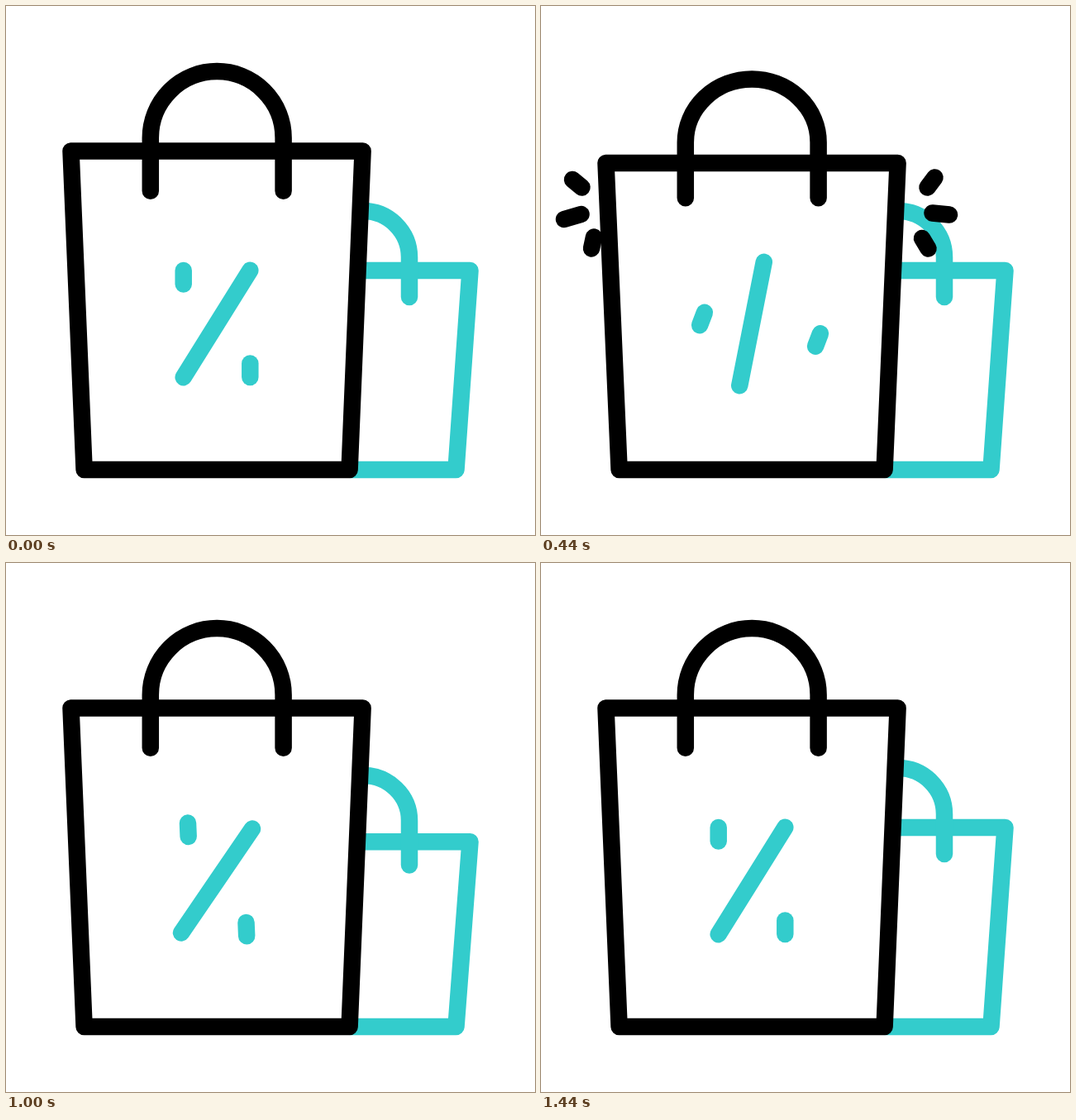
An HTML page for the animation above (1.48 s loop, 640 by 640 pixels).

```html
<!DOCTYPE html>
<html lang="en">
<head>
<meta charset="utf-8">
<title>Shopping bags</title>
<style>
  html, body { margin: 0; width: 100%; height: 100%; overflow: hidden; background: #fff; }
  svg { display: block; width: 100%; height: 100%; }
  g { fill: none; stroke-width: 20.5; stroke-linecap: round; stroke-linejoin: round; }
  .ink { stroke: #000; }
  .teal { stroke: #33cccc; }
  .solid { fill: #fff; }
</style>
</head>
<body>
<svg viewBox="0 0 640 640">
  <g class="teal" id="back">
    <path id="backBag"/>
    <path id="backHandle"/>
  </g>
  <g class="teal" id="backSparks"></g>
  <g class="ink" id="frontSparks"></g>
  <g id="front">
    <g class="ink">
      <path id="bag" class="solid"/>
      <path id="handle"/>
    </g>
    <g class="teal">
      <path id="slash" d="M214.7 449.2 L295.3 319.8"/>
      <path id="dotA" d="M0 -8.2 V8.2"/>
      <path id="dotB" d="M0 -8.2 V8.2"/>
    </g>
  </g>
</svg>
<script>
const LOOP = 1480, STEP = 40;
const $ = id => document.getElementById(id);
const set = (id, name, value) => $(id).setAttribute(name, value);

// Smooth curve through [time, value] keys, at rest at both ends.
function track(...keys) {
  const last = keys.length - 1;
  const slope = i => i === 0 || i === last ? 0 :
    (keys[i + 1][1] - keys[i - 1][1]) / (keys[i + 1][0] - keys[i - 1][0]);
  return t => {
    if (t <= keys[0][0]) return keys[0][1];
    if (t >= keys[last][0]) return keys[last][1];
    const i = keys.findIndex(k => k[0] > t) - 1;
    const [t0, a] = keys[i], [t1, b] = keys[i + 1];
    const d = t1 - t0, u = (t - t0) / d, w = u * u * (3 - 2 * u);
    return a + (b - a) * w + d * u * (1 - u) * (slope(i) * (1 - u) - slope(i + 1) * u);
  };
}

function hop(t, start, length, height) {
  const u = (t - start) / length;
  return u > 0 && u < 1 ? -4 * height * u * (1 - u) : 0;
}

const squash = (peak, mid) => track([120, 0], [320, peak], [440, mid], [500, 0]);
const front = {
  rim: squash(35.5, 14.5),
  grip: squash(20, 8.5),
  shoulder: squash(18.5, 5.5),
  crown: squash(12.5, 9.5)
};
const backSquash = track([120, 0], [320, 1], [440, 0], [900, 0], [1020, 0.5], [1090, 0]);

// The percent sign: the slash turns one way, the dots tilt the other way.
const spinTimes = [280, 320, 440, 680, 880, 1060];
const spinTrack = (...values) => track(...values.map((v, i) => [spinTimes[i], v]));
const spin = spinTrack(0, 1.35, 20.75, 97.2, 159.5, 180);
const dots = {
  dotA: [spinTrack(214.7, 212.5, 195, 217, 267.5, 295.3),
         spinTrack(328.2, 332, 378.5, 447, 450.5, 440.8)],
  dotB: [spinTrack(295.3, 299.5, 335, 319, 250.5, 214.7),
         spinTrack(440.8, 439.5, 404, 325.5, 307, 328.2)]
};

// Each spark is x, y of its inner end and x, y of its outer end.
const sparkSets = [
  {
    id: "frontSparks",
    head: track([380, -0.6], [440, 1], [500, 1.48]),
    tail: track([400, -0.6], [440, 0], [560, 1.48]),
    rays: [
      [49.5, 219.5, 38, 210], [48.5, 252, 28, 258], [64, 279.5, 61, 293.5],
      [467.5, 219.5, 476.5, 207.5], [473.5, 250.5, 494, 252.5], [461, 281, 468.5, 293.5]
    ]
  },
  {
    id: "backSparks",
    head: track([1080, -0.6], [1120, 1], [1180, 2.4]),
    tail: track([1100, -0.6], [1120, 0], [1240, 2.4]),
    rays: [
      [488, 260.5, 483, 254], [511, 268.3, 515, 258], [532.5, 281, 539.5, 279.5]
    ]
  }
];

for (const s of sparkSets) {
  s.paths = s.rays.map(() => $(s.id).appendChild(
    document.createElementNS("http://www.w3.org/2000/svg", "path")));
}

function drawSparks(s, t) {
  const head = s.head(t), tail = s.tail(t);
  const shown = head - tail > 0.02;
  s.rays.forEach(([x0, y0, x1, y1], i) => {
    const at = k => `${x0 + (x1 - x0) * k} ${y0 + (y1 - y0) * k}`;
    s.paths[i].setAttribute("d", shown ? `M${at(tail)} L${at(head)}` : "");
  });
}

function draw(t) {
  const rim = 175.4 + front.rim(t);
  const grip = 223.7 + front.grip(t);
  const shoulder = 159.5 + front.shoulder(t);
  const crown = 79.1 + front.crown(t);
  set("bag", "d", `M78.5 ${rim} H431.6 L415.6 561 H94.6 Z`);
  set("handle", "d", `M174.8 ${grip} V${shoulder} A80.4 ${shoulder - crown} 0 0 1 335.6 ${shoulder} V${grip}`);
  set("front", "transform", `translate(0 ${hop(t, 450, 220, 55)})`);

  const q = backSquash(t);
  const bend = 304 + 16 * q, top = 248 + 19.5 * q;
  set("backBag", "d", `M427 ${320 + 37 * q} H561.5 L544.5 561 H418`);
  set("backHandle", "d", `M432 ${top} A56 ${bend - top} 0 0 1 488 ${bend} V${352 + 29 * q}`);
  set("back", "transform", `translate(0 ${hop(t, 1100, 200, 29.5)})`);

  const angle = spin(t);
  set("slash", "transform", `rotate(${-angle} 255 384.5)`);
  for (const id in dots) {
    const [x, y] = dots[id];
    set(id, "transform", `translate(${x(t)} ${y(t)}) rotate(${angle})`);
  }
  for (const s of sparkSets) drawSparks(s, t);
}

const start = performance.now();
function tick() {
  const t = (performance.now() - start) % LOOP;
  draw(Math.floor(t / STEP) * STEP);
  requestAnimationFrame(tick);
}
tick();
</script>
</body>
</html>
```
